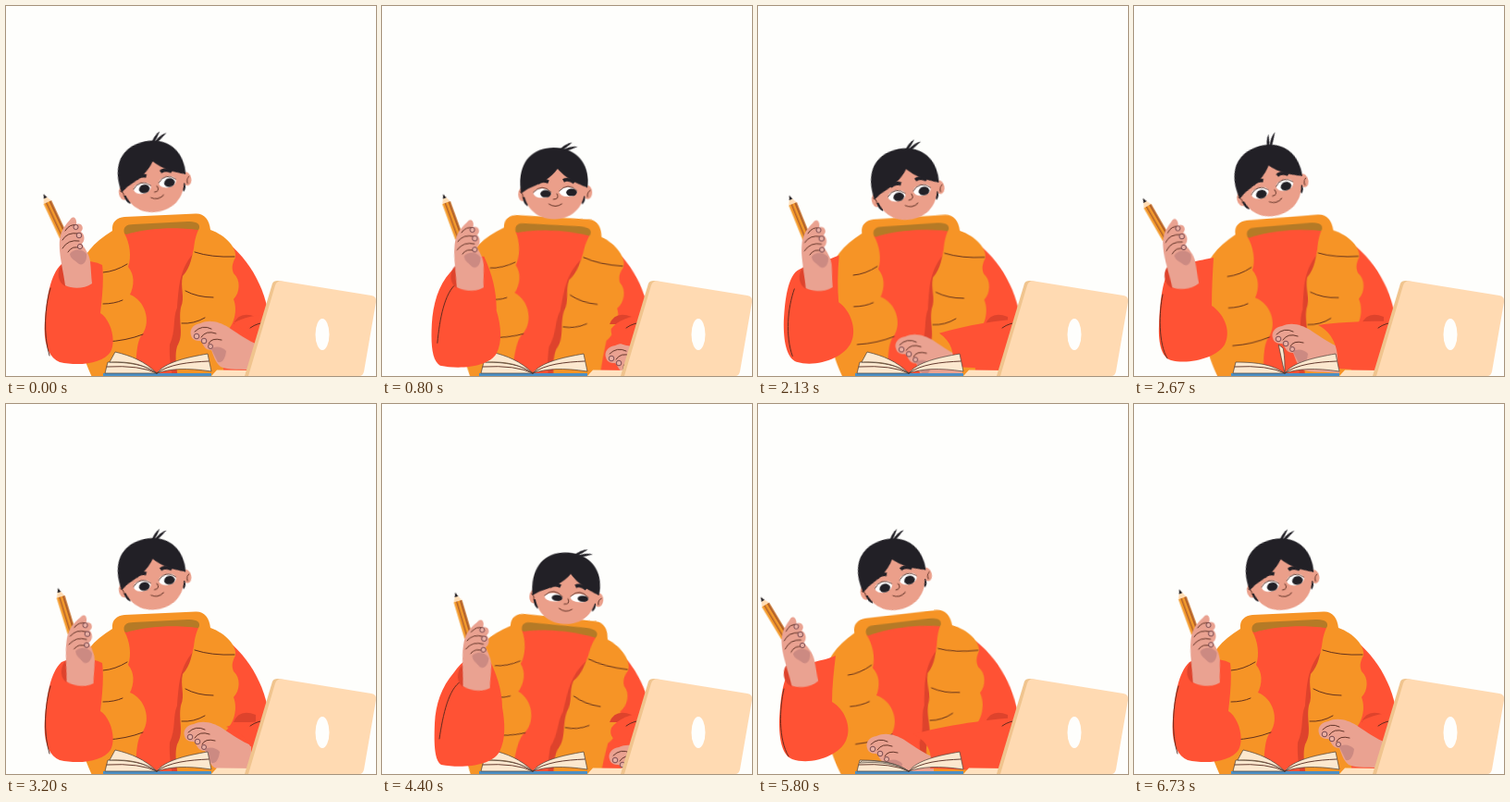
Recreate the animation shown at these times as an HTML page without scripts. Size 400 by 400 pixels, loop 6.8 s.

```html
<!DOCTYPE html>
<html lang="en">
<head>
<meta charset="utf-8">
<title>Studying at the laptop</title>
<style>
html, body { margin: 0; width: 100%; height: 100%; overflow: hidden; background: #fefefc; }
svg { display: block; width: 100%; height: 100%; }

.red { fill: #ff5234; }
.shade { fill: #de432c; }
.vest { fill: #f69426; }
.skin { fill: #eb9f8a; }
.hand { fill: #eaa291; }
.palm { fill: #cc8a82; }
.hair { fill: #222026; }
.page { fill: #fce8cf; stroke: #4a4038; stroke-width: .7; }
.line { fill: none; stroke: #53281c; stroke-width: .9; stroke-linecap: round; }
.nail { fill: #eab0a4; stroke: #6e4048; stroke-width: .9; }

.move { animation: 3.4s cubic-bezier(.4, .2, .6, .8) infinite; }
.head { animation-name: head; }
.sprig { animation-name: sprig; transform-origin: 11px -37px; }
.face { animation-name: face; }
.eye { animation-name: blink; transform-box: fill-box; transform-origin: 50% 60%; }
.pupil { animation-name: look; }
.torso { animation-name: torso; transform-origin: 175px 400px; }
.sleeve { animation-name: sleeve; }
.fold { animation-name: fold; }
.wave { animation-name: wave; transform-origin: 78px 298px; }
.pencil { animation-name: pencil; transform-origin: 0 48px; }
.reach { animation-name: reach; }
.forearm { animation-name: forearm; }
.flap { animation-name: flap; }

@keyframes head {
  0%, 100% { transform: translate(158px, 184.5px) rotate(-12deg); }
  9.7% { transform: translate(159px, 186px) rotate(-11deg); }
  23.5% { transform: translate(186px, 192px) rotate(-1deg); }
  29.4% { transform: translate(199px, 199.5px) rotate(4deg); }
  38% { transform: translate(203px, 196px) rotate(2deg); }
  47.06% { transform: translate(203.5px, 194px) rotate(1deg); }
  50.9% { transform: translate(199px, 191px) rotate(-1deg); }
  64.7% { transform: translate(155px, 193px) rotate(-12deg); }
  70.6% { transform: translate(145.5px, 184.5px) rotate(-16deg); }
  78.5% { transform: translate(146px, 189px) rotate(-16deg); }
  87.3% { transform: translate(153px, 180px) rotate(-14deg); }
  94.1% { transform: translate(158px, 184px) rotate(-12deg); }
}
@keyframes sprig {
  0%, 70.6%, 94.1%, 100% { transform: none; }
  29.4% { transform: rotate(17deg); }
  47.06% { transform: rotate(12deg); }
  78.5% { transform: rotate(-27deg); }
}
@keyframes face {
  0%, 29.4%, 70%, 100% { transform: none; }
  47.06% { transform: translate(6px, 2px); }
}
@keyframes blink {
  0%, 18%, 62%, 100% { transform: scaleY(1); }
  29.4%, 43% { transform: scaleY(.75); }
  47.06% { transform: scaleY(.35); }
  51% { transform: scaleY(.8); }
}
@keyframes look {
  0%, 94%, 100% { transform: none; }
  29.4%, 47% { transform: translate(2px, -.5px); }
  70.6%, 80% { transform: translate(-1px, .5px); }
}
@keyframes torso {
  0%, 94.1%, 100% { transform: none; }
  9.7% { transform: rotate(.4deg); }
  23.5% { transform: translate(0, 2px) rotate(6deg); }
  29.4% { transform: translate(0, 4px) rotate(8.5deg); }
  47.06% { transform: rotate(9.5deg); }
  50.9% { transform: rotate(8.5deg); }
  64.7% { transform: translate(0, 2px) rotate(-2deg); }
  70.6% { transform: rotate(-4deg); }
  78.5% { transform: translate(0, 2px) rotate(-2deg); }
}
@keyframes sleeve {
  0%, 94.1%, 100% { d: path("M104 280C92 274 72 274 60 279C48 290 44 315 42 340C40 365 46 380 58 385C80 390 105 386 113 374C120 360 112 338 102 332C104 315 106 295 104 280Z"); }
  9.7% { d: path("M105 279C93 273 74 275 62 280C50 291 46 316 44 341C42 365 47 380 59 385C81 390 106 386 114 374C121 360 113 338 104 332C106 314 107 294 105 279Z"); }
  29.4% { d: path("M112 268C98 270 86 278 78 290C64 306 58 325 57 345C56 370 57 385 64 390C85 394 118 392 127 376C134 362 133 345 130 328C130 310 124 290 112 268Z"); }
  47.06% { d: path("M112 254C96 259 82 275 74 288C62 306 58 325 59 345C60 370 64 388 72 390C95 393 125 385 138 362C142 345 139 322 134 308C124 296 112 285 112 254Z"); animation-timing-function: cubic-bezier(.45, .1, .4, 1); }
  70.6% { d: path("M84 272C72 278 46 280 35 288C27 296 24 320 23 345C23 365 27 380 37 384C58 391 88 380 95 364C102 350 94 330 80 322C80 306 82 288 84 272Z"); }
  78.5% { d: path("M86 272C78 274 52 278 40 284C31 292 28 320 27 345C26 365 30 380 40 383C60 388 90 380 98 366C106 350 96 332 84 324C84 306 85 288 86 272Z"); }
}
@keyframes fold {
  0%, 94.1%, 100% { d: path("M48 305C42 325 40 355 47 378"); }
  29.4% { d: path("M85 300C72 308 66 335 62 362"); }
  47.06% { d: path("M113 292C90 305 78 320 65 362"); animation-timing-function: cubic-bezier(.45, .1, .4, 1); }
  70.6% { d: path("M28 308C23 330 22 362 33 381"); }
  78.5% { d: path("M31 312C27 330 26 365 36 381"); }
}
@keyframes wave {
  0%, 100% { transform: none; }
  4.4% { transform: translate(0, 0) rotate(-5deg); }
  9.7% { transform: translate(4px, 0) rotate(2deg); }
  14% { transform: translate(8px, 1px) rotate(8deg); }
  23.5% { transform: translate(17px, 3px) rotate(5deg); }
  29.4% { transform: translate(24px, 5px) rotate(8.5deg); }
  38% { transform: translate(37px, 6px) rotate(16deg); }
  47.06% { transform: translate(45px, 8px) rotate(26deg); }
  50.9% { transform: translate(42px, 7px) rotate(23deg); }
  64.7% { transform: translate(-18px, 3px) rotate(0deg); }
  70.6% { transform: translate(-28px, 1px) rotate(-6deg); }
  78.5% { transform: translate(-23px, 1px) rotate(-5deg); }
  87.3% { transform: translate(-10px, 1px) rotate(2deg); }
  94.1% { transform: translate(2px, 0) rotate(8deg); }
  97.9% { transform: translate(0, 0) rotate(5deg); }
}
@keyframes pencil {
  0%, 29.4%, 64.7%, 100% { transform: none; }
  47.06% { transform: translate(14px, 3px) rotate(12deg); }
}
@keyframes reach {
  0%, 97.9%, 100% { transform: none; }
  9.7% { transform: translate(8px, 2px); }
  23.5% { transform: translate(42px, 24px); }
  29.4% { transform: translate(46px, 28px); }
  33% { transform: translate(48px, 33px); }
  37% { transform: translate(47px, 28px); }
  42% { transform: translate(51px, 34px); }
  47.06%, 50.9% { transform: translate(54px, 36px); }
  64.7% { transform: translate(-62px, 12px); }
  70.6% { transform: translate(-82px, 16px); }
  78.5% { transform: translate(-50px, 3px); }
  87.3% { transform: translate(-22px, 0); }
  94.1% { transform: translate(-7px, 3px); }
}
@keyframes forearm {
  0%, 97.9%, 100% { d: path("M295 333C270 333 255 337 246 343C258 350 266 357 270 366L295 372Z"); }
  29.4% { d: path("M295 334C270 333 255 340 248 350C245 358 250 365 262 367L295 372Z"); }
  47.06%, 50.9% { d: path("M295 336C272 336 258 342 252 352C249 362 255 368 264 371L295 376Z"); }
  64.7% { d: path("M295 338C260 339 220 346 190 354C205 363 208 376 205 392L295 396Z"); }
  70.6% { d: path("M295 338C250 340 200 348 168 357C185 366 189 378 186 394L295 398Z"); }
  78.5% { d: path("M295 341C250 340 220 342 199 345C214 353 222 368 220 392L295 396Z"); }
  94.1% { d: path("M295 344C270 342 250 345 238 349C252 354 260 361 264 370L295 376Z"); }
}
@keyframes flap {
  0%, 64%, 91%, 100% { d: path("M163 397C150 384 135 378 118 374L112 385C135 384 150 388 163 397Z"); }
  70.6% { d: path("M163 397C150 388 130 385 112 386L110 388C135 386 150 390 163 397Z"); }
  78.5% { d: path("M163 397C160 385 158 375 156 366L161 370C163 380 163 388 163 397Z"); }
  86% { d: path("M163 397C175 384 195 380 218 378L219 380C195 382 175 388 163 397Z"); }
  86.01% { d: path("M163 397C150 388 130 385 112 386L110 388C135 386 150 390 163 397Z"); }
}
</style>
</head>
<body>
<svg viewBox="0 0 400 400" role="img" aria-label="A student with a pencil, a book and a laptop">
  <rect width="400" height="400" fill="#fefefc"/>

  <g class="move torso">
    <path class="red" d="M235 252C265 275 283 308 286 350L280 430H200Z"/>
    <path class="red" d="M122 238C150 232 190 230 212 236L206 430H112Z"/>
    <path class="shade" d="M202 268C187 286 187 304 185 326C180 338 184 350 177 366C176 384 180 400 184 430H200Z"/>
    <path fill="#b57a26" d="M122 243C122 233 128 230 145 229L200 227C212 227 214 234 211 243C190 238 150 240 130 247Z"/>
    <path class="vest" d="M115 243C114 233 120 229 128 228L205 224.500C214 224 220 231 221 242C238 248 250 262 248 272C244 279 244 284 246 289C254 296 253 310 246 317C251 330 246 345 238 353C235 380 234 400 236 430H188C190 410 180 385 185 368C193 355 186 342 189 326C194 315 188 304 191 292C200 282 201 270 203 262C204 252 206 246 209 240C210 234 204 233 196 233L138 236C130 236 126 239 128 246C134 256 136 272 132 282C139 290 139 302 134 312C150 318 157 340 148 354C140 362 140 385 140 430H105C94 400 83 385 80 360L78 290C82 270 94 256 115 243Z"/>
    <path class="line" d="M105 288Q118 287 131 279M105 322Q117 322 126 318M108 363Q130 362 148 355M204 266Q222 272 247 271M194 308Q207 315 224 315M190 343Q203 344 215 337"/>
  </g>

  <g class="move head">
    <g class="move sprig hair">
      <path transform="translate(9 -37) rotate(41)" d="M-1 2Q-2-7 1-13Q2-6 1.300 2Z"/>
      <path transform="translate(12 -36) rotate(57)" d="M-1 2Q-2.500-8 1-15Q1.500-7 1.300 2Z"/>
    </g>
    <ellipse class="skin" cx="-34" cy="11" rx="5" ry="7.500"/>
    <ellipse class="skin" cx="36" cy="10" rx="5" ry="7.500"/>
    <path class="line" d="M-37 8q4 2 3 7M39 8q-4 2-3 7"/>
    <path class="hair" d="M-34 14Q-34 21-29 24L-27 14ZM33 14Q34 20 30 23L27 14Z"/>
    <path class="skin" d="M-33 0C-33-20-20-34 0-34S33-20 33 0C35 24 20 38.500 0 38.500S-35 24-33 0Z"/>
    <g class="move face">
      <g class="move eye">
        <ellipse cx="-13" cy="10" rx="9.500" ry="6" fill="#fff"/>
        <ellipse class="move pupil" cx="-11" cy="11.200" rx="5.800" ry="4.600" fill="#222026"/>
      </g>
      <g class="move eye">
        <ellipse cx="15" cy="9" rx="9.500" ry="6" fill="#fff"/>
        <ellipse class="move pupil" cx="17" cy="10.200" rx="5.800" ry="4.600" fill="#222026"/>
      </g>
      <path class="line" d="M-22.500 9Q-13-1-3.500 9M5.500 8Q15-2 24.500 8"/>
      <path fill="none" stroke="#222026" stroke-width="3.800" d="M-18-1Q-13-5-6-2M10-3Q15-6 22-1"/>
      <path class="line" d="M3 11Q6 17-1 17M-6 22Q1 27 8 22"/>
    </g>
    <path class="hair" d="M-36 10C-40-22-25-39 0-39S40-20 36 5C30 2 16-2 4-16C-3-6-15 0-28 5C-31 7-33 8-36 10Z"/>
  </g>

  <path class="shade" d="M246 344Q252 329 270 336V344Z"/>
  <g class="move reach">
    <path class="hand" d="M200 356C198 350 202 344 210 343C220 338 232 342 240 347C252 355 262 362 272 366V394C255 392 240 394 232 390C225 384 224 376 222 372C214 372 214 366 210 362C204 362 201 360 200 356Z"/>
    <path class="palm" d="M222 371C225 367 234 368 238 373C237 381 234 386 229 385Z"/>
    <path class="line" d="M204 352Q212 344 222 349M211 358Q216 350 227 354M219 365Q222 358 233 361"/>
    <circle class="nail" cx="206" cy="357" r="2.800"/>
    <circle class="nail" cx="214" cy="362" r="2.800"/>
    <circle class="nail" cx="221" cy="368" r="2.500"/>
  </g>
  <path class="move forearm red" d="M295 333C270 333 255 337 246 343C258 350 266 357 270 366L295 372Z"/>
  <path class="line" d="M264 348Q272 342 284 342"/>

  <g>
    <rect x="105" y="397" width="117" height="3" fill="#4c8fc4"/>
    <path class="page" d="M107 397L110 385C135 385 150 388 163 397Z"/>
    <path class="page" d="M163 397C172 385 195 380 218 376L222 395C195 391 178 392 163 397Z"/>
    <path class="line" d="M163 397C176 387 198 385 219 384M109 390Q145 388 163 397" stroke-width=".6"/>
    <path class="move flap page" d="M163 397C150 384 135 378 118 374L112 385C135 384 150 388 163 397Z"/>
  </g>

  <path fill="#ffe2c0" d="M222 400L228 393.500L268 394V400Z"/>
  <path fill="#f0c48e" d="M288 300Q289 297 294 297L300 298L268 400H258Z"/>
  <path fill="#ffdab2" d="M291 302Q293 296.500 299 297.500L395 313Q401 314 400 320L387 395Q386 400 382 400H262Z"/>
  <ellipse cx="342" cy="355" rx="7.500" ry="17" fill="#fefefc"/>

  <path class="move sleeve red" d="M104 280C92 274 72 274 60 279C48 290 44 315 42 340C40 365 46 380 58 385C80 390 105 386 113 374C120 360 112 338 102 332C104 315 106 295 104 280Z"/>
  <path class="move fold line" d="M48 305C42 325 40 355 47 378"/>

  <g class="move wave">
    <path class="shade" d="M64 303C55 298 55 286 60 280L66 278Z"/>
    <g transform="translate(41 204) rotate(-25)">
      <g class="move pencil">
        <path fill="#f39a2c" d="M-4.500 9H4.500V50H-4.500Z"/>
        <path fill="#b4622a" d="M-2 9H-.5V50H-2ZM2 9H4.500V50H2Z"/>
        <path fill="#ffdcb4" d="M0 0L4.500 9H-4.500Z"/>
        <path class="hair" d="M0-1L1.900 4H-1.900Z"/>
      </g>
    </g>
    <path class="hand" d="M64 302C62 285 55 262 59 248C61 240 66 235 70 230C74 226 77 231 76 236C82 234 85 240 81 244C86 248 85 254 82 257C85 262 90 268 91 276C92 285 92 292 93 300C84 306 72 306 64 302Z"/>
    <path class="palm" d="M69 268C73 262 83 262 87 268C88 275 84 281 79 279C75 275 70 274 69 268Z"/>
    <path class="line" d="M64 243Q69 235 76 237M61 253Q66 244 78 246M61 262Q67 252 79 254M67 266Q72 258 80 262"/>
    <circle class="nail" cx="75.500" cy="239" r="2.600"/>
    <circle class="nail" cx="79" cy="248" r="2.800"/>
    <circle class="nail" cx="80" cy="260" r="2.600"/>
  </g>
</svg>
</body>
</html>
```
